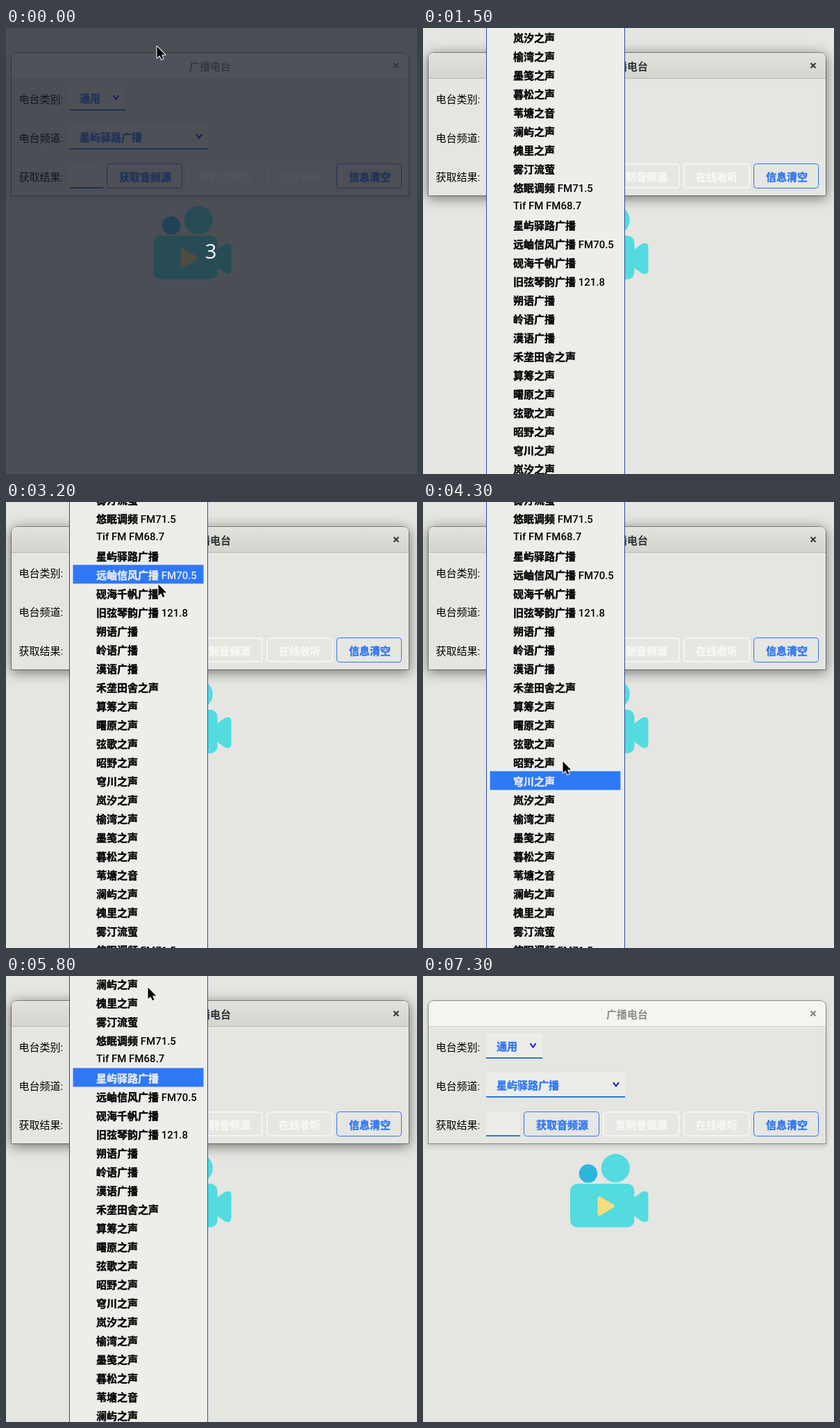
An HTML page that plays this animation: 592 px wide and 642 px high, repeating every 7.6 s.

```html
<!DOCTYPE html>
<html lang="zh-CN">
<head>
<meta charset="utf-8">
<title>广播电台</title>
<style>
html, body { margin: 0; width: 100%; height: 100%; overflow: hidden; background: #e5e5e1; }
#win {
  position: absolute; left: 8px; top: 36px; width: 572px; height: 205px;
  border-radius: 8px 8px 0 0; background: #e5e5e1;
  box-shadow: 0 2px 6px 2px rgba(0,0,0,.14), 0 0 0 1px rgba(0,0,0,.36);
}
#bar {
  height: 36px; border-radius: 8px 8px 0 0; background: #f4f5ef;
  border-bottom: 1px solid #d0d1cc; box-sizing: content-box;
}
.raised #win { box-shadow: 0 3px 18px 1px rgba(0,0,0,.5), 0 0 0 1px rgba(0,0,0,.36); }
.active #bar { background: linear-gradient(#e1e2dc, #d4d5ce); border-color: #b4b5ae; box-shadow: inset 0 1px #f0f1ec; }
svg { position: absolute; left: 0; top: 0; width: 100%; height: 100%; }
text { font: 15px Roboto, "Noto Sans CJK SC", "Noto Sans CJK", sans-serif; white-space: pre; }
.b { font-weight: 700; stroke: currentColor; stroke-width: .35px; fill: currentColor; }
.latin { font-weight: 500; stroke: none; }
.blue { color: #2f76f2; }
.off { color: #f7f8f4; }
#head { font-weight: 700; fill: #8c8f8e; }
#cross { stroke: #7c7f7e; }
.active #head { fill: #2e3436; }
.active #cross { stroke: #2e3436; }
.row rect { fill: none; }
.row text { color: #000; }
.row.on rect { fill: #2f78f6; }
.row.on text { color: #e9ebec; }
#count { font: 29px "Open Sans", "Noto Sans", sans-serif; fill: #fff; text-anchor: middle; }
#arrow { fill: #000; stroke: #fff; stroke-width: 2; stroke-linejoin: round; paint-order: stroke; }
</style>
</head>
<body>
<div id="win"><div id="bar"></div></div>
<svg id="stage" viewBox="0 0 592 642" preserveAspectRatio="none"></svg>
<script>
const LOOP = 7600, STEP = 100, ROW = 27;

const stations = [
  '岚汐之声', '榆湾之声', '墨笺之声', '暮松之声', '苇塘之音', '澜屿之声', '槐里之声', '雾汀流萤',
  '悠眠调频 FM71.5', 'Tif FM FM68.7', '星屿驿路广播', '远岫信风广播 FM70.5', '砚海千帆广播',
  '旧弦琴韵广播 121.8', '朔语广播', '岭语广播', '漠语广播', '禾垄田舍之声', '算筹之声',
  '曙原之声', '弦歌之声', '昭野之声', '穹川之声'
];

// Markup helpers; text is placed by the vertical centre of its line.
const text = (x, mid, str, cls = '') => `<text x="${x}" y="${mid + 6}" class="${cls}">${
  str.replace(/[\w. ]+/g, '<tspan class="latin">$&</tspan>')}</text>`;
const chevron = (x, y) =>
  `<path d="M${x - 4} ${y - 3}L${x} ${y + 2.5}L${x + 4} ${y - 3}" fill="none" stroke="#1414d2" stroke-width="2"/>`;
const field = (y, w) =>
  `<path d="M91 ${y + 36}v-32q0 -4 4 -4h${w - 8}q4 0 4 4v32z" fill="#ecede9"/>
   <rect x="91" y="${y + 34}" width="${w}" height="2" fill="#2f78cf"/>`;
const button = (x, w, label, enabled) => {
  const line = enabled ? 1 : 2;
  return `<rect x="${x + line / 2}" y="${195 + line / 2}" width="${w - line}" height="${36 - line}" rx="4"
    fill="#e6e6e2" stroke="${enabled ? '#2f76f2' : '#f4f5f1'}" stroke-width="${line}"/>` +
    text(x + 18, 214, label, enabled ? 'b blue' : 'b off');
};
const row = k => {
  const name = stations[k % stations.length];
  const mid = ROW * k + 14 - (/^[\w. ]+$/.test(name) ? 2 : 0);
  return `<g class="row"><rect x="96.5" y="${ROW * k - 0.5}" width="188" height="27"/>${text(130, mid, name, 'b')}</g>`;
};

const camera = `
  <circle cx="238" cy="284.3" r="13.3" fill="#2eb5dc"/>
  <g fill="#53dbdf">
    <circle cx="277.3" cy="276.6" r="20.5"/>
    <rect x="212" y="299" width="92.5" height="62.8" rx="10"/>
    <path d="M304 319L315 311Q324.5 307 324.5 316V347Q324.5 357 315 353L304 345z"/>
  </g>
  <path d="M254 320L273 331L254 342.5z" fill="#f8dd7d" stroke="#f8dd7d" stroke-width="5" stroke-linejoin="round"/>`;

const form =
  `<text id="head" x="264" y="61">广播电台</text>
   <path id="cross" d="M558.5 50.5l7 7m0 -7l-7 7" stroke-width="2"/>` +
  ['电台类别:', '电台频道:', '获取结果:'].map((label, i) => text(18.5, 102 + 56 * i, label)).join('') +
  field(83, 81) + text(106, 101, '通用', 'b blue') + chevron(158.5, 100) +
  field(139, 200) + text(106, 157, stations[10], 'b blue') + chevron(278, 156) +
  field(195, 49) +
  button(145, 109, '获取音频源', true) + button(259, 111, '复制音频源', false) +
  button(375, 96, '在线收听', false) + button(476, 94, '信息清空', true);

const $ = id => document.getElementById(id);
$('stage').innerHTML = camera + form +
  `<g id="menu">
     <rect x="91.5" y="-2" width="199" height="646" fill="#edeeea" stroke="#23509f"/>
     <g id="list">${Array.from({ length: 32 }, (_, k) => row(k)).join('')}</g>
   </g>
   <rect id="shade" width="592" height="642" fill="#1a1d27"/>
   <text id="count" x="295" y="332">3</text>
   <path id="arrow" d="M0 0V16.5L3.8 13L6.4 18.8L9 17.6L6.5 12H11.7z"/>`;
const rows = [...document.querySelectorAll('.row')];

// Moves: { from, to } in ms and the place reached; things rest between moves.
const move = (from, to, ...place) => ({ from, to, place });
const pointerMoves = [
  move(100, 200, 220, 38),
  move(300, 600, 231, 127),
  move(700, 800, 238, 143),
  move(1100, 1400, 236, 150),
  move(1400, 1500, 228, -60),
  move(2600, 2800, 216, 75),
  move(2900, 3200, 219, 118),
  move(4000, 4200, 206, 395),
  move(4200, 4300, 201, 373),
  move(4300, 4900, 205, 612),
  move(5000, 5400, 203, 562),
  move(5400, 5800, 204, 16),
  move(6000, 6400, 206, 205),
  move(6400, 6500, 386, 149),
  move(6700, 7000, 188, 37),
  move(7100, 7200, 93, 7),
  move(7200, 7300, 93, -60)
];
const scrollMoves = [move(2900, 3200, -206), move(5700, 6000, 0)];

const follow = (moves, origin, t) => moves.reduce((at, { from, to, place }) => {
  const p = Math.min(1, Math.max(0, (t - from) / (to - from)));
  return at.map((v, i) => v + (place[i] - v) * p);
}, origin).map(Math.round);
const pointerAt = t => follow(pointerMoves, [217, 26], t);

function draw(t) {
  const open = t >= 1000 && t < 6600;
  const [scroll] = follow(scrollMoves, [0], t);
  const [x, y] = pointerAt(t);
  // The highlight trails the pointer by one step.
  const current = y < 0 ? -1 : Math.floor((pointerAt(t - STEP)[1] - scroll) / ROW);

  document.body.classList.toggle('active', open);
  document.body.classList.toggle('raised', open && t < 6500);
  $('menu').setAttribute('opacity', open ? (t < 1100 ? 0.6 : 1) : 0);
  $('list').setAttribute('transform', `translate(0 ${scroll})`);
  rows.forEach((el, k) => el.classList.toggle('on', k === current));
  $('shade').setAttribute('opacity', t < 100 ? 0.75 : t < 200 ? 0.3 : 0);
  $('count').setAttribute('opacity', t < 100 ? 1 : 0);
  $('arrow').setAttribute('transform', `translate(${x + 0.5} ${y + 0.5})`);
}

let start, last;
function tick(now) {
  start ??= now;
  const t = Math.floor((now - start) % LOOP / STEP) * STEP;
  if (t !== last) draw(last = t);
  requestAnimationFrame(tick);
}
draw(0);
requestAnimationFrame(tick);
</script>
</body>
</html>
```
